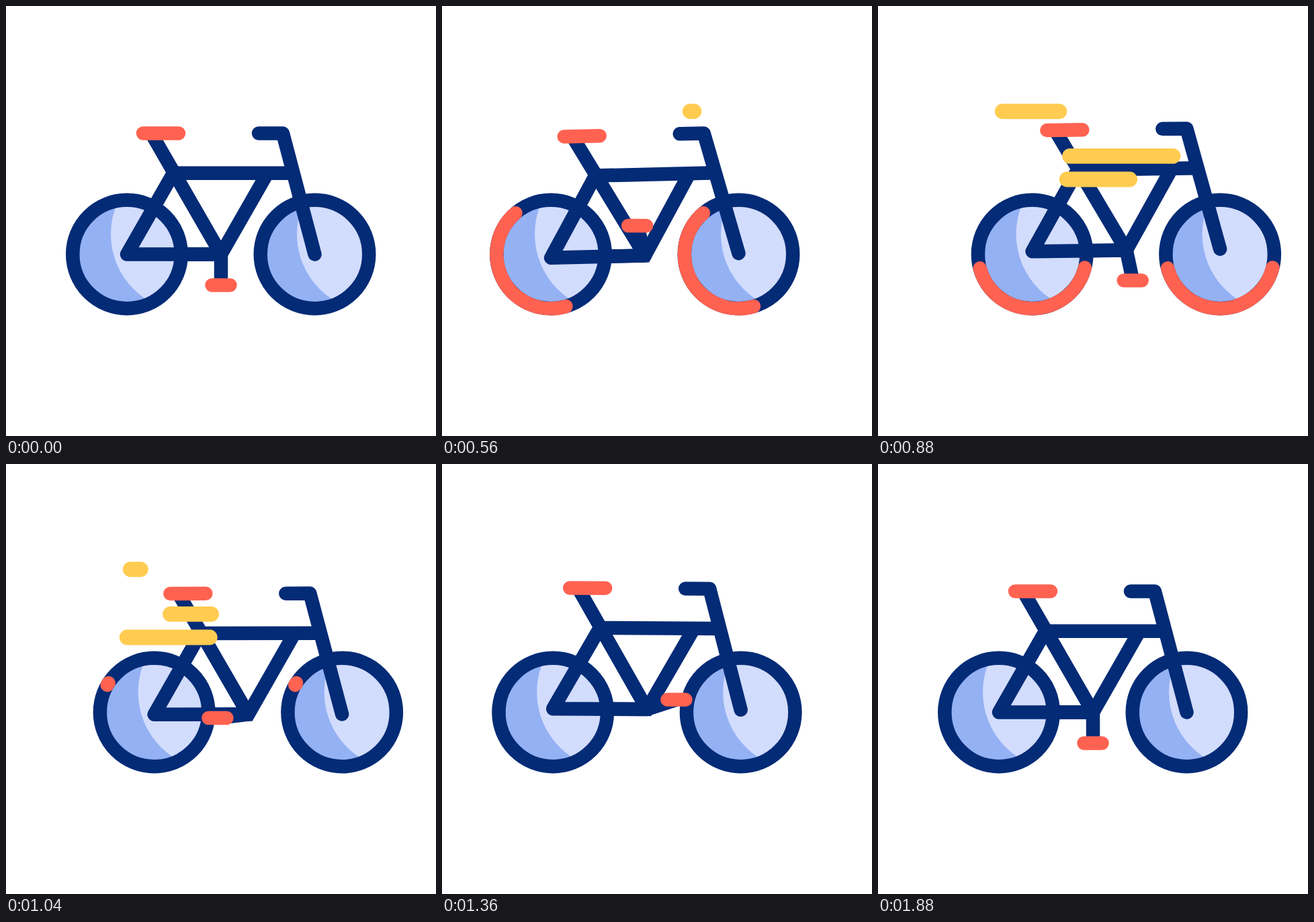
An HTML page that plays this animation: 640 px wide and 640 px high, repeating every 2040 ms.

```html
<!DOCTYPE html>
<html lang="en">
<head>
<meta charset="utf-8">
<title>Bicycle</title>
<style>
  html, body { margin: 0; width: 100%; height: 100%; overflow: hidden; background: #fff; }
  svg { display: block; width: 100%; height: 100%; }
  .line { fill: none; stroke-width: 20.5; }
  .navy { stroke: #032b76; }
  .red { stroke: #ff6251; }
  .round { stroke-linecap: round; stroke-linejoin: round; }
  .streak { stroke: #ffcc51; stroke-width: 22.8; stroke-linecap: round; }
</style>
</head>
<body>
<svg viewBox="0 0 640 640">
  <defs>
    <clipPath id="disc"><circle r="72"/></clipPath>
  </defs>
  <g id="bike">
    <g id="wheels"></g>
    <g id="frame" class="line navy">
      <path class="round" d="M249 249L180 369.5H320"/>
      <path d="M250 369.5H320L389 249"/>
      <path d="M216.5 190L320 369.5M249 248.8H430"/>
      <path class="round" d="M376 189.6H412L459.5 369.5"/>
      <path class="red round" d="M204 189.6H257"/>
    </g>
    <path id="crank" class="line navy"/>
    <path id="pedal" class="line red round"/>
  </g>
  <g id="streaks"></g>
</svg>
<script>
const LOOP = 2040, STEP = 40, LAST = 1880, RIDE = 1800;
const HUB_Y = 369.5, CRANK_X = 320, CRANK = 46;

// Keys are [time, value] pairs, eased between neighbours.
const SHIFT = [[0, 0], [470, -25.8], [928, 52], [1355, -14.8], [1800, 0]];
const LIFT = [[0, 0], [466, 5.2], [770, -9], [1180, 7.6], [1430, -7.3], [1880, 0]];
const TILT = [[0, 0], [610, -1.4], [1250, 0.35], [1880, 0]];
const ARC_HEAD = [[360, 0], [800, 360]];
const ARC_TAIL = [[656, 0], [1060, 360]];
const STREAKS = [
  { y: 156.8, head: [[530, 375], [820, 185.3]], tail: [[585, 375], [1135, 185.3]] },
  { y: 223.4, head: [[600, 444.6], [995, 244.6]], tail: [[850, 444.6], [1150, 244.6]] },
  { y: 258, head: [[700, 375], [1075, 175.3]], tail: [[870, 375], [1290, 175.3]] }
];

const $ = id => document.getElementById(id);
const set = (el, attrs) => {
  for (const name in attrs) el.setAttribute(name, attrs[name]);
};
const show = (el, visible) => set(el, { visibility: visible ? 'visible' : 'hidden' });

function ease(u) {
  u = Math.min(1, Math.max(0, u));
  return u * u * (3 - 2 * u);
}

function at(keys, t) {
  let value = keys[0][1];
  for (let i = 1; i < keys.length; i++) {
    const [t0, v0] = keys[i - 1], [t1, v1] = keys[i];
    if (t >= t0) value = v0 + (v1 - v0) * ease((t - t0) / (t1 - t0));
  }
  return value;
}

const wheel = (x, shadeX) => `
  <g transform="translate(${x} ${HUB_Y})">
    <circle r="72" fill="#94b1f3"/>
    <circle cx="${shadeX}" cy="-30" r="116" fill="#d2dcfd" clip-path="url(#disc)"/>
    <circle class="line navy" r="80.75"/>
    <circle class="arc line red round" r="80.75" pathLength="360"/>
  </g>`;

$('wheels').innerHTML = wheel(180, 92) + wheel(459.5, 89.5);
$('streaks').innerHTML = STREAKS.map(() => '<path class="streak"/>').join('');
const arcs = document.querySelectorAll('.arc');
const streakPaths = document.querySelectorAll('.streak');

function drawArcs(t) {
  const tail = at(ARC_TAIL, t);
  const length = at(ARC_HEAD, t) - tail;
  const turn = tail - 9 + 360 * ease(t / RIDE);
  for (const arc of arcs) {
    show(arc, length > 0);
    set(arc, { 'stroke-dasharray': `${length} 400`, transform: `rotate(${turn})` });
  }
}

function drawStreaks(t) {
  STREAKS.forEach(({ y, head, tail }, i) => {
    show(streakPaths[i], t > head[0][0] && t < tail[1][0]);
    set(streakPaths[i], { d: `M${at(tail, t)} ${y}H${at(head, t) - 0.01}` });
  });
}

function draw(t) {
  const lift = at(LIFT, t);
  set($('bike'), { transform: `translate(${at(SHIFT, t)} 0)` });
  set($('frame'), {
    transform: `translate(0 ${lift}) rotate(${at(TILT, t)} ${CRANK_X} ${HUB_Y})`
  });

  const angle = 4 * Math.PI * ease(t / RIDE);
  const y = HUB_Y + lift;
  const px = CRANK_X - CRANK * Math.sin(angle);
  const py = y + CRANK * Math.cos(angle);
  set($('crank'), { d: `M${CRANK_X} ${y}L${px} ${py}` });
  set($('pedal'), { d: `M${px - 13.5} ${py}h27` });

  drawArcs(t);
  drawStreaks(t);
}

const start = performance.now();
function tick() {
  const t = (performance.now() - start) % LOOP;
  draw(Math.min(LAST, Math.floor((t + 2) / STEP) * STEP));
  requestAnimationFrame(tick);
}
draw(0);
requestAnimationFrame(tick);
</script>
</body>
</html>
```
